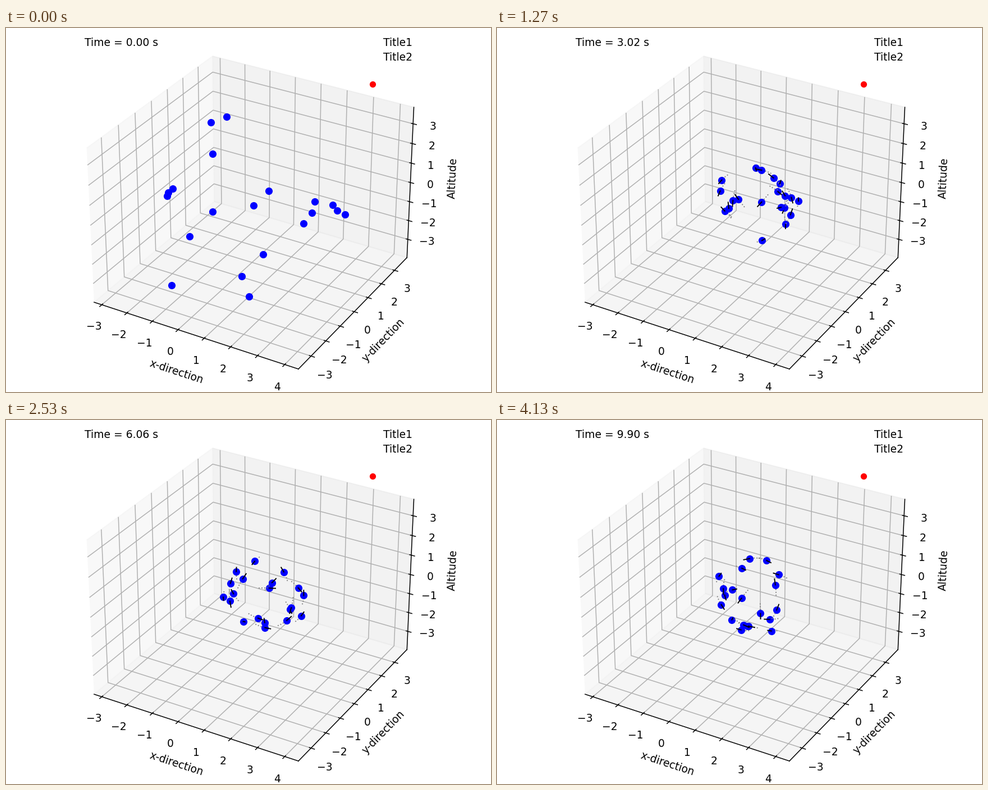
Animation, 864 px wide and 648 px high, one loop 4.19 s. Source, as a matplotlib script:

```python
import numpy as np
import matplotlib.pyplot as plt
from matplotlib.animation import FuncAnimation
from matplotlib.lines import Line2D
from matplotlib.transforms import Affine2D

W, H, DPI = 864, 648, 135
FRAMES, LOOP_MS = 63, 4190
STEP = 0.16                       # simulated seconds per frame
GATHER = 8                        # frames until the swarm has closed in
TRAIL = 1.5                       # trail length in frames
ARROW = 11                        # arrow length in pixels
CENTRE = np.array([462, 311, 0])  # screen x, screen y, depth

START = [(393, 158), (365, 168), (368, 224), (297, 286), (289, 293),
         (287, 299), (368, 327), (327, 371), (295, 458), (441, 316),
         (468, 290), (550, 309), (545, 329), (530, 348), (582, 315),
         (590, 325), (604, 332), (458, 403), (420, 442), (433, 478)]
N = len(START)


def unit(v):
    return v / np.linalg.norm(v, axis=-1, keepdims=True)


# Each drone closes in on a sphere and then circles on it.
rng = np.random.default_rng(4)
offset = np.column_stack([START, rng.uniform(-130, 130, N)]) - CENTRE
far = np.linalg.norm(offset, axis=1)
near = rng.uniform(55, 76, N)
out = unit(offset)
side = unit(np.cross(out, rng.normal(size=(N, 3))))
turn = 13 / near                  # about 13 pixels per frame


def swarm(t):
    u = min(t / GATHER, 1)
    radius = far + (near - far) * u * u * (3 - 2 * u)
    angle = turn * t * t / (t + 6)
    ring = np.cos(angle)[:, None] * out + np.sin(angle)[:, None] * side
    return CENTRE + radius[:, None] * ring


def heading(t, eps=0.05):
    return unit(swarm(t + eps) - swarm(t))


fig = plt.figure(figsize=(W / DPI, H / DPI), dpi=DPI)
ax = fig.add_axes([0, 0, 1, 1], projection="3d")
ax.set(xlabel="x-direction", ylabel="y-direction", zlabel="Altitude")
HALF = 3.904
for name, mid, top in (("x", 0.595, 4), ("y", 0.065, 3), ("z", -0.079, 3)):
    ax.set(**{f"{name}ticks": range(-3, top + 1),
              f"{name}lim": (mid - HALF, mid + HALF)})

clock = ax.text2D(0.05, 0.95, "", transform=ax.transAxes)
for y, title in ((0.95, "Title1"), (0.91, "Title2")):
    ax.text2D(0.95, y, title, transform=ax.transAxes, ha="right")

stage = Affine2D().scale(1 / W, -1 / H).translate(0, 1) + fig.transFigure


def line(x=(), y=(), **style):
    return fig.add_artist(Line2D(x, y, transform=stage, **style))


line([653], [99.5], marker="o", ms=20 ** 0.5, mew=1.5, color="red", ls="")
drones = [(line(color="gray", ls=":", lw=1),
           line(color="blue", marker="o", ms=6, ls=""),
           line(color="black", lw=1)) for _ in range(N)]


def update(n):
    clock.set_text(f"Time = {max(0, n * STEP - 0.02):.2f} s")
    path = np.array([swarm(t) for t in np.linspace(max(0, n - TRAIL), n, 9)])
    tips = path[-1] + ARROW * heading(n)
    for i, (trail, dot, arrow) in enumerate(drones):
        x, y, _ = path[-1, i]
        trail.set_data(path[:, i, 0], path[:, i, 1])
        dot.set_data([x], [y])
        arrow.set_data([x, tips[i, 0]], [y, tips[i, 1]])
        for part in (trail, arrow):
            part.set_visible(n > 0)
    return []


anim = FuncAnimation(fig, update, frames=FRAMES, interval=LOOP_MS / FRAMES,
                     repeat=True, repeat_delay=0, blit=False)
plt.show()
```
